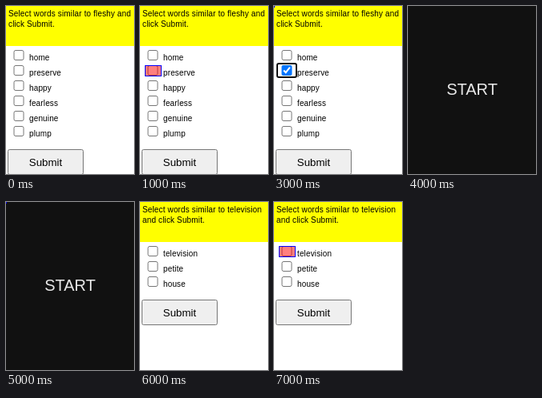
Animation of 160x210 px, one loop 8000 ms. Source, as an HTML page:

```html
<!DOCTYPE html>
<html lang="en">
<head>
<meta charset="utf-8">
<title>Word quiz</title>
<style>
html, body { margin: 0; width: 160px; height: 210px; overflow: hidden; background: #fff; }
#stage { position: relative; width: 160px; height: 210px; overflow: hidden;
  font: 10px/13px "Liberation Sans", Arial, sans-serif; letter-spacing: .14px; color: #000; }
#stage > *, .row, .row > *, .page > * { position: absolute; }
.page { inset: 0; }
.query { left: 0; top: 0; width: 154px; height: 44px; padding: 3px; background: #ff0; }
.row { left: 6px; height: 19px; }
.row input { left: 0; top: 0; width: 20px; height: 13px; margin: 0; }
.row input:checked { outline: -webkit-focus-ring-color auto 1px; outline-offset: 2px; }
.row span { left: 23px; top: 3px; white-space: nowrap; }
button { left: 2px; width: 95px; height: 32px; margin: 0;
  font: 13.333px "Liberation Sans", Arial, sans-serif; }
#cover { inset: 0; background: #111; color: #e8e8e8; font-size: 20px; line-height: 208px;
  letter-spacing: 0; text-align: center; }
#mark { box-sizing: border-box; left: 6px; width: 21px; height: 14px;
  border: 1px solid #00f; background: rgba(255, 0, 0, .5); }
#dot { left: 0; top: 0; width: 1px; height: 2px; background: #00f; }
</style>
</head>
<body>
<div id="stage"></div>
<script>
const stage = document.getElementById('stage');
const quizzes = [
  { word: 'fleshy', options: ['home', 'preserve', 'happy', 'fearless', 'genuine', 'plump'] },
  { word: 'television', options: ['television', 'petite', 'house'] }
];
const STEP = 1000, LOOP = 8 * STEP, TOP = 55, PITCH = 19;

function add(parent, tag, props) {
  const el = Object.assign(document.createElement(tag), props);
  parent.append(el);
  return el;
}

function buildPage({ word, options }) {
  const page = add(stage, 'div', { className: 'page' });
  add(page, 'div', { className: 'query', textContent: `Select words similar to ${word} and click Submit.` });
  const boxes = options.map((text, i) => {
    const row = add(page, 'div', { className: 'row' });
    row.style.top = TOP + i * PITCH + 'px';
    const box = add(row, 'input', { type: 'checkbox', tabIndex: -1 });
    add(row, 'span', { textContent: text });
    return box;
  });
  const button = add(page, 'button', { textContent: 'Submit', tabIndex: -1 });
  button.style.top = TOP + options.length * PITCH + 10 + 'px';
  return { page, boxes };
}

const [first, second] = quizzes.map(buildPage);
const cover = add(stage, 'div', { id: 'cover', textContent: 'START' });
const mark = add(stage, 'div', { id: 'mark' });
const dot = add(stage, 'div', { id: 'dot' });
const show = (el, on) => { el.style.display = on ? 'block' : 'none'; };

function draw(time) {
  const step = Math.floor(time % LOOP / STEP);
  show(first.page, step < 4);
  show(cover, step === 4 || step === 5);
  show(second.page, step > 5);
  first.boxes[1].checked = step === 2 || step === 3;
  show(mark, step === 1 || step === 7);
  mark.style.top = TOP + (step === 1 ? PITCH : 0) + 'px';
  show(dot, step === 3 || step === 5);
}

const start = performance.now();
function tick() {
  draw(performance.now() - start);
  requestAnimationFrame(tick);
}
tick();
</script>
</body>
</html>
```
